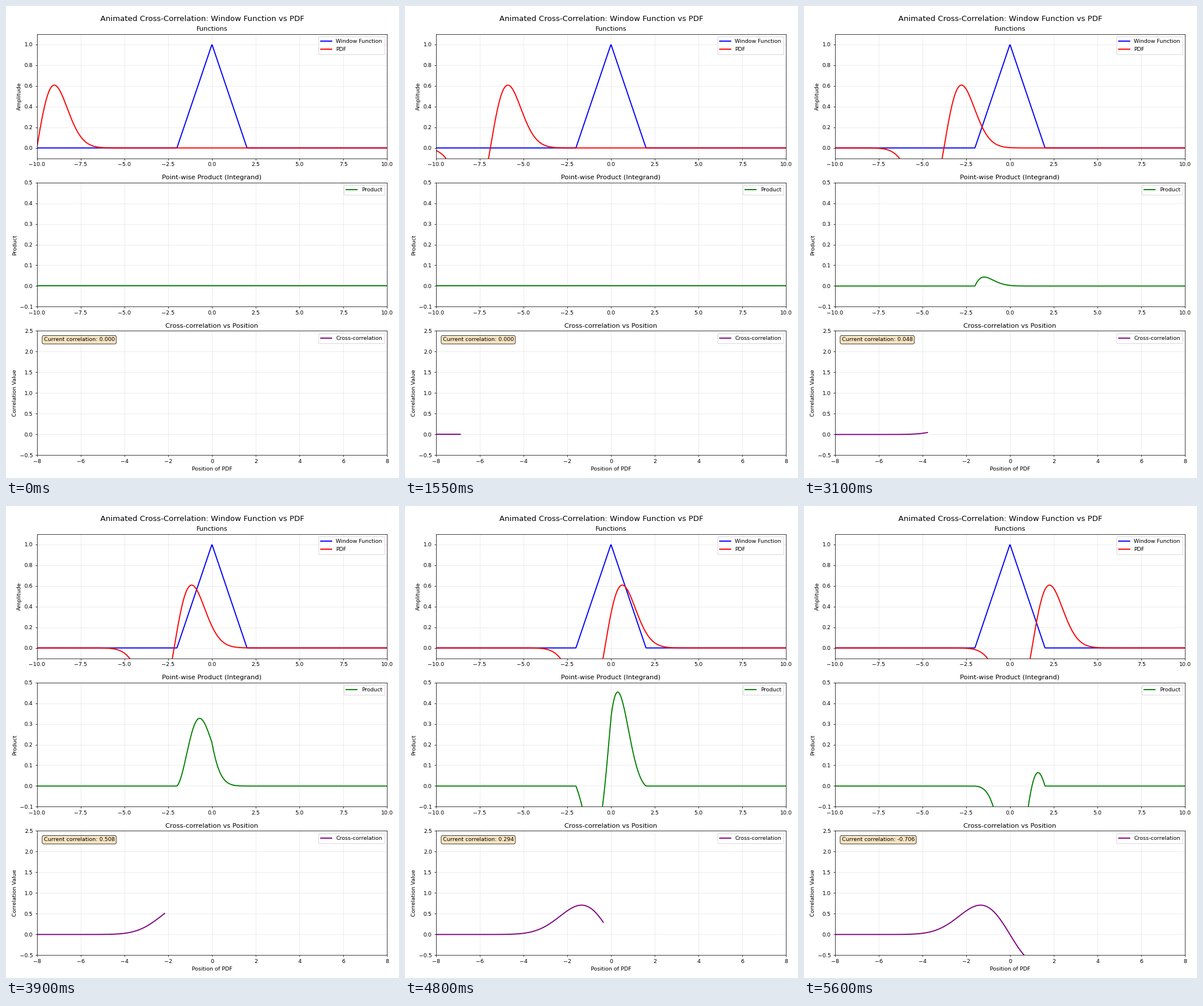
A matplotlib script that plays this animation: 683 by 820 pixels, repeating every 5.65 s.

```python
import numpy as np
import matplotlib.pyplot as plt
from matplotlib.animation import FuncAnimation

FRAMES = 113
INTERVAL = 50

x = np.linspace(-10, 10, 1000)
dx = x[1] - x[0]
shifts = np.linspace(-10, 10, 200)[:FRAMES]


def pdf(u):
    return u * np.exp(-u**2 / 2)


window = np.maximum(0, 1 - np.abs(x) / 2)
products = [window * pdf(x - s) for s in shifts]
corr = np.array([p.sum() * dx for p in products])

fig, axes = plt.subplots(3, 1, figsize=(10, 12), dpi=68.34)
fig.subplots_adjust(left=53.5 / 683.4, right=662.4 / 683.4,
                    bottom=39.6 / 820, top=771.3 / 820, hspace=42 / 216)
fig.suptitle("Animated Cross-Correlation: Window Function vs PDF", fontsize=14)
ax_fn, ax_prod, ax_corr = axes


def setup(ax, title, ylabel, xlim, ylim):
    ax.set_title(title)
    ax.set_ylabel(ylabel)
    ax.set_xlim(-xlim, xlim)
    ax.set_ylim(*ylim)
    ax.grid(True, alpha=0.3)
    ax.legend(loc="upper right")


ax_fn.plot(x, window, "b-", lw=2, label="Window Function")
pdf_line, = ax_fn.plot([], [], "r-", lw=2, label="PDF")
prod_line, = ax_prod.plot([], [], "g-", lw=2, label="Product")
corr_line, = ax_corr.plot([], [], color="purple", lw=2, label="Cross-correlation")

setup(ax_fn, "Functions", "Amplitude", 10, (-0.1, 1.1))
setup(ax_prod, "Point-wise Product (Integrand)", "Product", 10, (-0.1, 0.5))
setup(ax_corr, "Cross-correlation vs Position", "Correlation Value", 8, (-0.5, 2.5))
ax_corr.set_xlabel("Position of PDF")

readout = ax_corr.text(0.02, 0.95, "", transform=ax_corr.transAxes, va="top",
                       bbox=dict(boxstyle="round", facecolor="wheat", alpha=0.8))


def update(i):
    pdf_line.set_data(x, pdf(x - shifts[i]))
    prod_line.set_data(x, products[i])
    corr_line.set_data(shifts[:i + 1], corr[:i + 1])
    readout.set_text(f"Current correlation: {corr[i]:.3f}")
    return pdf_line, prod_line, corr_line, readout


anim = FuncAnimation(fig, update, frames=FRAMES, interval=INTERVAL,
                     repeat=True, repeat_delay=0)
plt.show()
```
